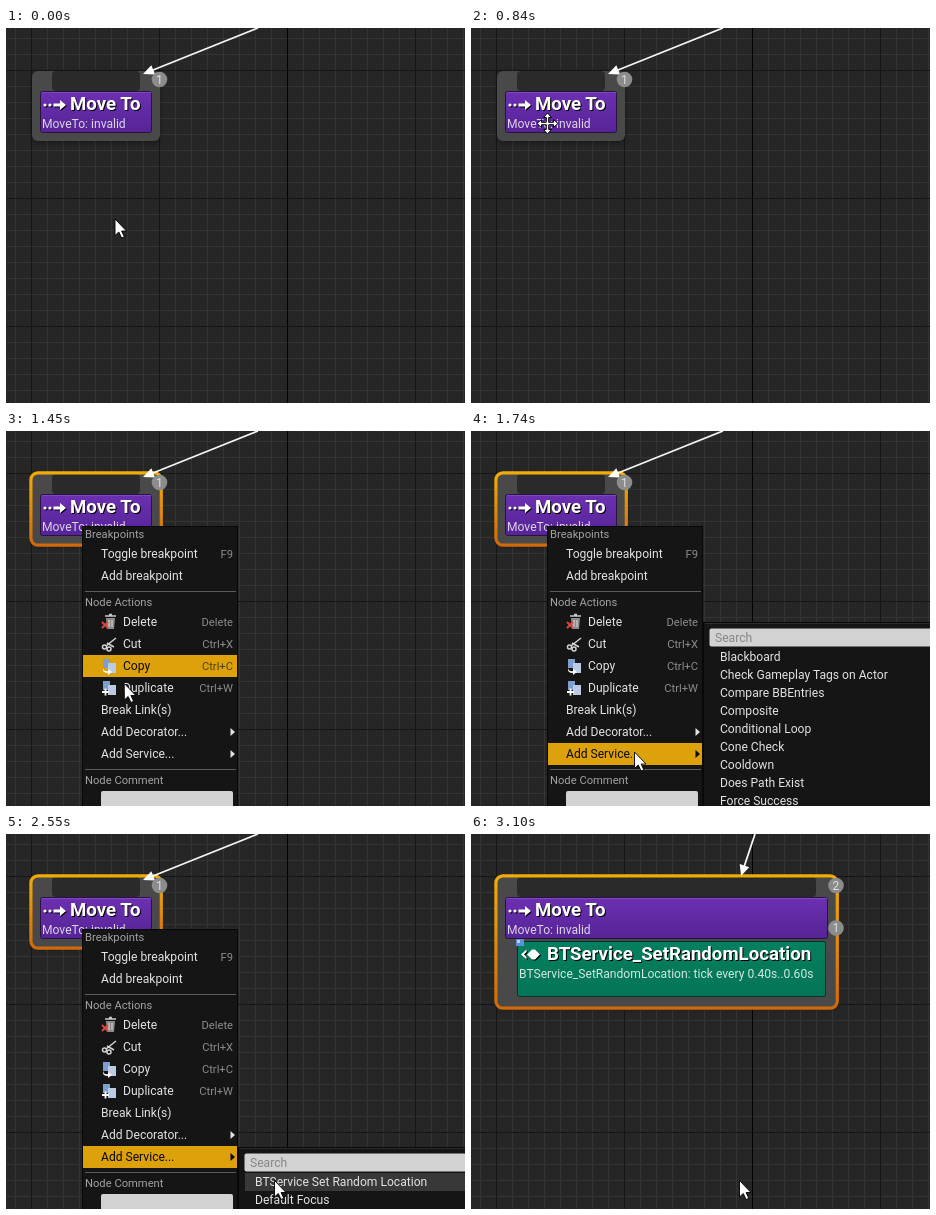
Write an HTML page that moves like this. It is 459 px wide and 375 px high and loops after 4850 ms.

```html
<!DOCTYPE html>
<html lang="en">
<head>
<meta charset="utf-8">
<title>Adding a service to a node</title>
<style>
html, body { margin: 0; width: 100%; height: 100%; overflow: hidden; background: #262626; }
svg { display: block; width: 459px; height: 375px; font: 12.1px Roboto, sans-serif; }
text { white-space: pre; }
.title { font-weight: 700; font-size: 18.67px; fill: #fff; filter: drop-shadow(1px 1.5px 0.6px #000); }
.icon { filter: drop-shadow(1px 1.5px 0.6px #000); }
.small { font-size: 11.2px; }
</style>
</head>
<body>
<svg viewBox="0 0 459 375">
  <defs>
    <pattern id="minor" x="9" y="10" width="16" height="16" patternUnits="userSpaceOnUse">
      <path d="M.5 0V16M0 .5H16" stroke="#343434"/>
    </pattern>
    <pattern id="major" x="25" y="42" width="128" height="128" patternUnits="userSpaceOnUse">
      <path d="M.5 0V128M0 .5H128" stroke="#161616"/>
    </pattern>
    <linearGradient id="gold" x2="0" y2="1"><stop stop-color="#f2ac08"/><stop offset="1" stop-color="#d0690a"/></linearGradient>
    <linearGradient id="purple" x2="0" y2="1"><stop stop-color="#6c30b2"/><stop offset="1" stop-color="#562496"/></linearGradient>
    <linearGradient id="green" x2="0" y2="1"><stop stop-color="#047f60"/><stop offset="1" stop-color="#047556"/></linearGradient>
  </defs>
  <path d="M0 0H459V375H0Z" fill="#262626"/>
  <path d="M0 0H459V375H0Z" fill="url(#minor)"/>
  <path d="M0 0H459V375H0Z" fill="url(#major)"/>
  <path d="M281.5 0V375" stroke="#000"/>
  <g id="scene"></g>
</svg>
<script>
const LOOP = 4850;
const scene = document.getElementById('scene');

const rect = (x, y, w, h, fill, extra = '') =>
  `<rect x="${x}" y="${y}" width="${w}" height="${h}" fill="${fill}" ${extra}/>`;
const path = (d, fill, extra = '') => `<path d="${d}" fill="${fill}" ${extra}/>`;
const line = (d, stroke, width = 1) => path(d, 'none', `stroke="${stroke}" stroke-width="${width}"`);
const text = (x, y, s, fill = '#e2e2e2', extra = '') => `<text x="${x}" y="${y}" fill="${fill}" ${extra}>${s}</text>`;
const at = (x, y, body, extra = '') => `<g transform="translate(${x} ${y})" ${extra}>${body}</g>`;

// Cursor way points: time, x, y, easing exponent of the leg that ends there
const route = [
  [500, 109, 191, 1], [840, 76.5, 95.5, 2], [1260, 77, 97, 1], [1450, 118, 252, 1],
  [1740, 163.5, 321, 2], [2320, 163.5, 321, 1], [2550, 268.5, 346.5, 2]
];
function cursorAt(t) {
  const i = route.findIndex(p => p[0] > t);
  if (i < 1) return (i ? route.at(-1) : route[0]).slice(1, 3);
  const [t0, x0, y0] = route[i - 1], [t1, x1, y1, power] = route[i];
  const k = 1 - (1 - (t - t0) / (t1 - t0)) ** power;
  return [x0 + (x1 - x0) * k, y0 + (y1 - y0) * k];
}

function wire(x0, y0, x1, y1) {
  const angle = Math.atan2(y1 - y0, x1 - x0) * 180 / Math.PI;
  return line(`M${x0} ${y0}L${x1 - (x1 - x0) * .06} ${y1 - (y1 - y0) * .06}`, '#f4f4f4', 1.8) +
    `<path d="M0 0L-11 -5V5Z" fill="#fff" transform="translate(${x1} ${y1}) rotate(${angle})"/>`;
}

const badge = (x, y, n) => `<circle cx="${x}" cy="${y}" r="7.8" fill="#8c8c8c"/>` +
  text(x, y + 4.3, n, '#e0e0e0', 'text-anchor="middle"');

function node(width, height, selected) {
  const right = 26 + width;
  return rect(26, 44, width, height + 1, '#000', 'rx="7" opacity=".35" style="filter:blur(2px)"') +
    rect(26, 43, width, height, '#494949', 'rx="6"') +
    rect(46, 43, width - 40, 20, '#2a2a2a', 'rx="4"') +
    rect(34.5, 63.5, width - 17, 41, 'url(#purple)', 'rx="2" stroke="#28133f"') +
    line(`M36 64.5H${right - 9}`, '#8048c0') +
    (selected ? rect(24.9, 41.9, width + 2.4, height + 2.2, 'none', 'rx="7" stroke="url(#gold)" stroke-width="3.2"') : '') +
    at(37, 77, '<circle cx="2" r="1.6"/><circle cx="7" r="1.6"/><path d="M10.5 -1.5H17V-5L23 0 17 5V1.5H10.5Z"/>', 'class="icon" fill="#fff"') +
    text(64, 82, 'Move To', '#fff', 'class="title"') +
    text(36, 100, 'MoveTo: invalid', '#dcd4e8');
}

const plainNode = selected => node(128, 70, selected) + wire(252, 0, 137, 46) + badge(153.5, 51.5, 1);

const serviceNode = () => node(339, 130, true) +
  rect(46.5, 107.5, 308, 55, 'url(#green)', 'rx="2" stroke="#0b3127"') +
  rect(45, 105, 8, 7, '#5b8fdc') + rect(46, 106, 3, 3, '#b9d3f5') +
  at(50, 120.5, '<path d="M5.5 -5L0 0 5.5 5V2.5L3 0 5.5 -2.5ZM6 0L11 -5H14L19 0 14 5H11Z"/>', 'class="icon" fill="#fff"') +
  text(76, 126, 'BTService_SetRandomLocation', '#fff', 'class="title"') +
  text(48, 144, 'BTService_SetRandomLocation: tick every 0.40s..0.60s', '#d3e8e1') +
  wire(284, 0, 270, 42) + badge(365, 51.5, 2) + badge(365, 94, 1);

const pages = '<path d="M1 -7H8V2H1Z" fill="#7f9ed0"/><path d="M6 -3H14V7H6Z" fill="#bccbe4"/>';
const icons = {
  Delete: '<path d="M4 -4H13L12 7H5Z" fill="#8b8b8b"/><path d="M3 -6H14M7 -7.5H10M7 -2V5M10 -2V5" stroke="#c9c9c9" stroke-width="1.3"/><path d="M0 0L6 6M6 0L0 6" stroke="#d8483c" stroke-width="2"/>',
  Cut: '<g fill="none" stroke="#d4d4d4" stroke-width="1.5"><path d="M4 2L14 -6M5 -1L12 3"/><circle cx="2.5" cy="3" r="2"/><circle cx="7" cy="5" r="2"/></g>',
  Copy: pages + '<path d="M1 2Q2 6 6 5V3L10 6 6 9V7Q0 7 1 2Z" fill="#fff"/>',
  Duplicate: pages + '<path d="M0 4H7M3.5 .5V7.5" stroke="#fff" stroke-width="1.8"/>'
};
const rows = [
  [123, 'Toggle breakpoint', 'F9'], [145, 'Add breakpoint'], [191, 'Delete', 'Delete'],
  [213, 'Cut', 'Ctrl+X'], [235, 'Copy', 'Ctrl+C'], [257, 'Duplicate', 'Ctrl+W'],
  [279, 'Break Link(s)'], [301, 'Add Decorator...', '>'], [323, 'Add Service...', '>']
];

function menuRow([y, label, key], pointerY) {
  const hot = Math.abs(pointerY - y) <= 11, ink = hot ? '#0c0a04' : '#e2e2e2';
  const icon = icons[label];
  return (hot ? rect(77, y - 11, 154, 22, '#dca10b') : '') +
    (icon ? at(96, y, icon) : '') +
    text(icon ? 117 : 95, y + 4, label, ink) +
    (key === '>' ? path(`M224.5 ${y - 4}L229 ${y}L224.5 ${y + 4}Z`, ink)
      : key ? text(227, y + 4, key, hot ? '#54420f' : '#8c8c8c', 'class="small" text-anchor="end"') : '');
}

const menu = (pointerY, opacity) => `<g opacity="${opacity}">` +
  rect(76.5, 95.5, 155, 290, '#151515', 'stroke="#080808"') +
  [[103, 'Breakpoints'], [171, 'Node Actions'], [349, 'Node Comment']]
    .map(([y, s]) => text(79, y + 4, s, '#a2a2a2', 'class="small"')).join('') +
  line('M79 160.5H230M79 338.5H230', '#5c5c5c') +
  rows.map(r => menuRow(r, pointerY)).join('') +
  rect(95, 360, 132, 30, '#d2d2d2', 'rx="2"') + '</g>';

const decorators = ['Blackboard', 'Check Gameplay Tags on Actor', 'Compare BBEntries', 'Composite',
  'Conditional Loop', 'Cone Check', 'Cooldown', 'Does Path Exist', 'Force Success'];
const services = ['BTService Set Random Location', 'Default Focus'];

const submenu = (top, items, pointer) =>
  rect(232.5, top + .5, 240, 200, '#151515', 'stroke="#080808"') +
  line(`M234 ${top + 1.5}H459`, '#2c2c2c') +
  rect(238.5, top + 6.5, 240, 18, '#d2d2d2', 'rx="2"') +
  text(244, top + 20, 'Search', '#868686') +
  items.map((s, i) => {
    const y = top + 35 + i * 18;
    const hot = pointer[0] > 238 && Math.abs(pointer[1] - y) < 9;
    return (hot ? rect(239, y - 9, 220, 18, '#383838') : '') + text(249, y + 4, s);
  }).join('');

const arrow = path('M0 0V16.5L3.8 13 6.6 19 9.3 17.8 6.6 12H11.5Z', '#fff', 'stroke="#000" stroke-width=".9"');
const cross = path('M0 -10.5L4 -6H1.2V-1.2H6V-4L10.5 0 6 4V1.2H1.2V6H4L0 10.5 -4 6H-1.2V1.2H-6V4L-10.5 0 -6 -4V-1.2H-1.2V-6H-4Z',
  '#fff', 'stroke="#000" stroke-width="1"');

function draw(t) {
  const pointer = cursorAt(t);
  const overNode = t < 960 && pointer[1] < 113;
  let out = t < 3060 ? plainNode(t >= 900) : serviceNode();
  if (t >= 900 && t < 3020) {
    // The highlight trails the pointer slightly
    const hoverY = t < 1260 ? 0 : t >= 1740 ? 323 : cursorAt(t - 30)[1];
    out += menu(hoverY, Math.min(1, (t - 900) / 120));
    if (t >= 2070) out += submenu(313, services, pointer);
    else if (t >= 1740) out += submenu(191, decorators, pointer);
  }
  return out + at(...pointer, overNode ? cross : arrow);
}

let shown;
function frame() {
  const next = draw(performance.now() % LOOP);
  if (next !== shown) scene.innerHTML = shown = next;
  requestAnimationFrame(frame);
}
frame();
</script>
</body>
</html>
```
